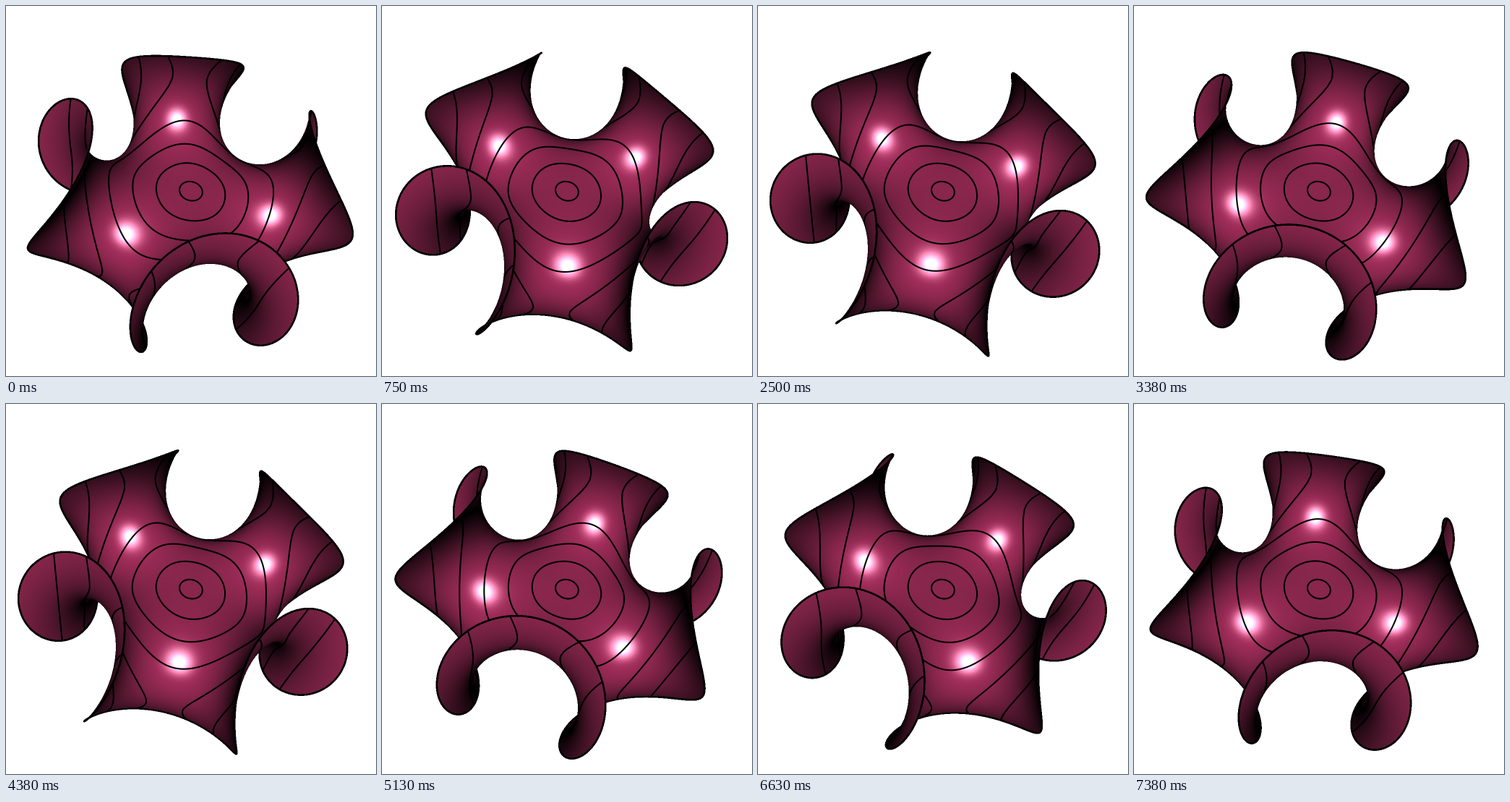
Write an HTML page with a canvas that moves like this. It is 512 px wide and 512 px high and loops after 7500 ms.

```html
<!DOCTYPE html>
<html lang="en">
<head>
<meta charset="utf-8">
<title>Rotating Enneper surface</title>
<style>
html, body { margin: 0; width: 100%; height: 100%; overflow: hidden; background: #fff; }
canvas { display: block; width: 100vw; height: 100vh; }
</style>
</head>
<body>
<canvas id="view" width="512" height="512"></canvas>
<script>
const SIZE = 512, SS = 2, N = SIZE * SS;
const LOOP = 7500, STEP = 125, POSES = 15;
const RAD = Math.PI / 180;

// Surface: four-fold Enneper, |z| <= R
const R = 1.1, RINGS = 48, SPOKES = 256;
// Camera
const DIST = 4, FOCAL = 653.5 * SS;
const cy = Math.cos(10 * RAD), sy = Math.sin(10 * RAD);
const cx = Math.cos(35 * RAD), sx = Math.sin(35 * RAD);
// Look
const BASE = [168, 47, 94], SHINE = 48;
const GAP = 0.1975, LEVELS = 6, LINE = 1.02 * SS, EDGE = 1.35 * SS, BIAS = 0.0025;

const ctx = document.getElementById('view').getContext('2d');
const big = document.createElement('canvas');
big.width = big.height = N;
const bigCtx = big.getContext('2d');
const img = bigCtx.createImageData(N, N);
const px = img.data;
const depth = new Float32Array(N * N);

// Per vertex: screen x, screen y, 1/depth, radius, diffuse, half-vector cosine
const STRIDE = 6;
const verts = new Float32Array((RINGS + 1) * SPOKES * STRIDE);

function toView(x, y, z) {
  const z1 = cy * z - sy * x;
  return [cy * x + sy * z, cx * y + sx * z1, cx * z1 - sx * y];
}

function surface(r, th, spin) {
  const k = r ** 7 / 7, a = th + spin, b = spin - 7 * th;
  return [
    r * Math.cos(a) - k * Math.cos(b),
    r * Math.sin(a) - k * Math.sin(b),
    r ** 4 / 2 * Math.cos(4 * th)
  ];
}

function normal(r, th, spin) {
  const g = r ** 3, a = spin - 3 * th, s = 1 + g * g;
  return [-2 * g * Math.cos(a) / s, -2 * g * Math.sin(a) / s, (1 - g * g) / s];
}

function project(v) {
  const q = 1 / (DIST - v[2]);
  return [N / 2 + FOCAL * v[0] * q, N / 2 - FOCAL * v[1] * q, q];
}

function buildVerts(spin) {
  let o = 0;
  for (let i = 0; i <= RINGS; i++) {
    for (let j = 0; j < SPOKES; j++) {
      const r = R * i / RINGS, th = 2 * Math.PI * j / SPOKES;
      const p = surface(r, th, spin);
      const v = toView(...p), n = toView(...normal(r, th, spin));
      // half vector between the light (0,0,1) and the eye
      const e = Math.hypot(v[0], v[1], DIST - v[2]);
      const hx = -v[0] / e, hy = -v[1] / e, hz = (DIST - v[2]) / e + 1;
      const h = Math.hypot(hx, hy, hz);
      verts.set(project(v), o);
      verts[o + 3] = Math.hypot(p[0], p[1]);
      verts[o + 4] = n[2];
      verts[o + 5] = (n[0] * hx + n[1] * hy + n[2] * hz) / h;
      o += STRIDE;
    }
  }
}

function shade(o, radius, grad, dif, half) {
  const level = Math.min(LEVELS - 1, Math.floor(radius / GAP));
  const off = Math.abs(radius - (level + 0.5) * GAP);
  const ink = Math.min(1, Math.max(0, LINE + 0.5 - off / grad));
  const d = Math.abs(dif), s = 255 * Math.pow(Math.min(1, Math.abs(half)), SHINE);
  for (let c = 0; c < 3; c++) px[o + c] = Math.min(255, BASE[c] * d + s) * (1 - ink);
}

function triangle(a, b, c) {
  const V = verts;
  const ax = V[a], ay = V[a + 1];
  const ux = V[b] - ax, uy = V[b + 1] - ay;
  const vx = V[c] - ax, vy = V[c + 1] - ay;
  const area = ux * vy - vx * uy;
  if (Math.abs(area) < 1e-6) return;
  const x0 = Math.max(0, Math.floor(ax + Math.min(0, ux, vx)));
  const x1 = Math.min(N - 1, Math.ceil(ax + Math.max(0, ux, vx)));
  const y0 = Math.max(0, Math.floor(ay + Math.min(0, uy, vy)));
  const y1 = Math.min(N - 1, Math.ceil(ay + Math.max(0, uy, vy)));
  const q = V[a + 2], qb = V[b + 2] - q, qc = V[c + 2] - q;
  const m = V[a + 3], mb = V[b + 3] - m, mc = V[c + 3] - m;
  const d = V[a + 4], db = V[b + 4] - d, dc = V[c + 4] - d;
  const h = V[a + 5], hb = V[b + 5] - h, hc = V[c + 5] - h;
  const grad = Math.hypot(mb * vy - mc * uy, mc * ux - mb * vx) / Math.abs(area) + 1e-9;
  for (let y = y0; y <= y1; y++) {
    const dy = y + 0.5 - ay;
    for (let x = x0; x <= x1; x++) {
      const dx = x + 0.5 - ax;
      const s = (dx * vy - vx * dy) / area, t = (ux * dy - dx * uy) / area;
      if (s < -1e-4 || t < -1e-4 || s + t > 1.0001) continue;
      const i = y * N + x, z = q + s * qb + t * qc;
      if (z <= depth[i]) continue;
      depth[i] = z;
      shade(i * 4, m + s * mb + t * mc, grad, d + s * db + t * dc, h + s * hb + t * hc);
    }
  }
}

function drawMesh() {
  for (let i = 0; i < RINGS; i++) {
    for (let j = 0; j < SPOKES; j++) {
      const k = (j + 1) % SPOKES;
      const a = (i * SPOKES + j) * STRIDE, b = (i * SPOKES + k) * STRIDE;
      const c = a + SPOKES * STRIDE, d = b + SPOKES * STRIDE;
      triangle(a, c, d);
      if (i) triangle(a, d, b);
    }
  }
}

function drawEdge(spin) {
  const count = 4000;
  for (let n = 0; n < count; n++) {
    const [ex, ey, q] = project(toView(...surface(R, 2 * Math.PI * n / count, spin)));
    for (let y = Math.floor(ey - EDGE); y <= ey + EDGE; y++) {
      for (let x = Math.floor(ex - EDGE); x <= ex + EDGE; x++) {
        if (x < 0 || y < 0 || x >= N || y >= N) continue;
        if (Math.hypot(x + 0.5 - ex, y + 0.5 - ey) > EDGE) continue;
        const i = y * N + x;
        if (q + BIAS < depth[i]) continue;
        px[i * 4] = px[i * 4 + 1] = px[i * 4 + 2] = 0;
      }
    }
  }
}

function render(pose) {
  const spin = 6 * (pose + 1) * RAD;
  px.fill(255);
  depth.fill(0);
  buildVerts(spin);
  drawMesh();
  drawEdge(spin);
  bigCtx.putImageData(img, 0, 0);
  const out = document.createElement('canvas');
  out.width = out.height = SIZE;
  out.getContext('2d').drawImage(big, 0, 0, SIZE, SIZE);
  return out;
}

// The surface repeats every quarter turn, so a few poses cover the loop
const cache = [];
function pose(i) {
  return cache[i] || (cache[i] = render(i));
}

// Steps fall on whole hundredths of a second
function stepAt(t) {
  const k = Math.floor(t / STEP);
  return k % 2 && t < k * STEP + 5 ? k - 1 : k;
}

let shown = -1;
function tick() {
  const i = stepAt(performance.now() % LOOP) % POSES;
  if (i !== shown) {
    ctx.drawImage(pose(i), 0, 0);
    shown = i;
  }
  requestAnimationFrame(tick);
}

for (let i = 0; i < POSES; i++) pose(i);
tick();
</script>
</body>
</html>
```
